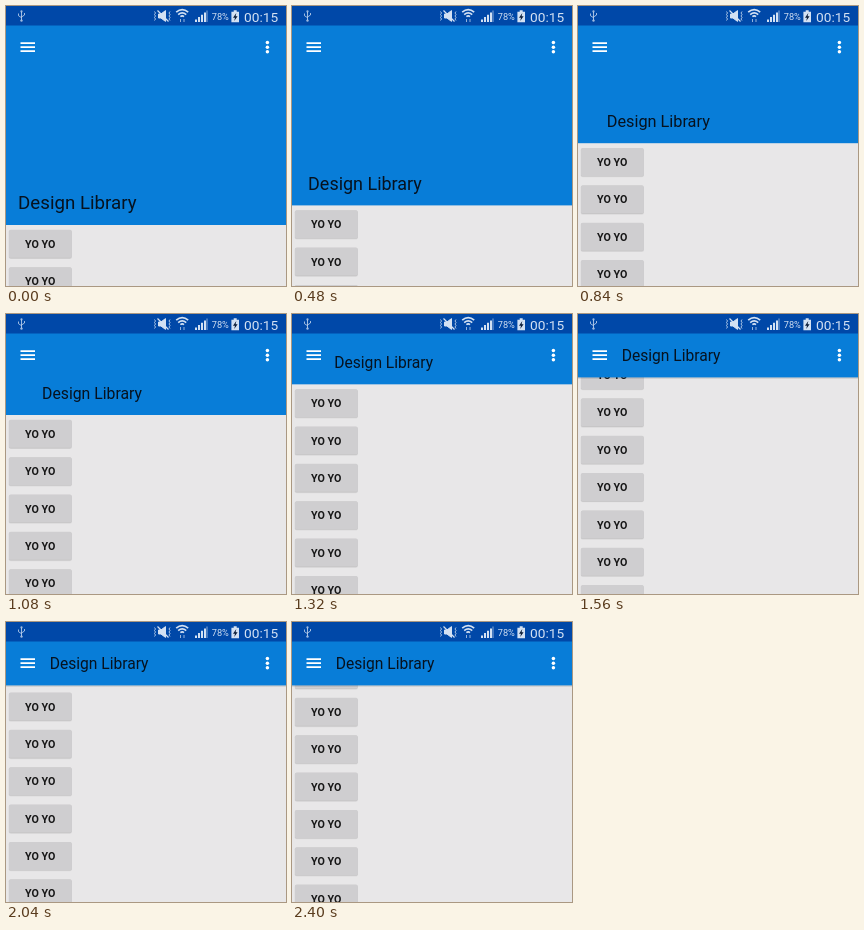
An HTML page that plays this animation: 280x280 px, repeating every 2520 ms.

```html
<!DOCTYPE html>
<html lang="en">
<head>
<meta charset="utf-8">
<title>Collapsing toolbar</title>
<style>
  html, body { margin: 0; width: 100%; height: 100%; overflow: hidden; background: #e8e7e8; }
  svg { display: block; width: 100vw; height: 100vh; font-family: Roboto, "Noto Sans", sans-serif; }
</style>
</head>
<body>
<svg viewBox="0 0 280 280">
  <defs>
    <linearGradient id="shade" x1="0" y1="0" x2="0" y2="1">
      <stop offset="0" stop-color="#000" stop-opacity=".2"/>
      <stop offset="1" stop-color="#000" stop-opacity="0"/>
    </linearGradient>
    <g id="button">
      <rect x="2.6" y="-13.7" width="63.4" height="29" rx="2" fill="#000" opacity=".06"/>
      <rect x="3" y="-13.6" width="62.6" height="28.2" rx="1.6" fill="#000" opacity=".1"/>
      <rect x="3" y="-14" width="62.6" height="28" rx="1.5" fill="#cfced0"/>
      <text x="34.2" y="4.1" font-size="10.7" font-weight="700" text-anchor="middle" fill="#161616">YO YO</text>
    </g>
  </defs>

  <rect width="280" height="280" fill="#e8e7e8"/>
  <g id="list"></g>
  <rect id="shadow" width="280" height="2" fill="url(#shade)"/>
  <rect id="header" y="19" width="280" fill="#087dd8"/>
  <text id="title" fill="#06121f">Design Library</text>

  <!-- toolbar icons -->
  <path d="M14.5 37.1h14.5M14.5 41.1h14.5M14.5 45.1h14.5" stroke="#fff" stroke-width="1.7"/>
  <g fill="#fff">
    <circle cx="261.4" cy="36.6" r="1.75"/>
    <circle cx="261.4" cy="41.2" r="1.75"/>
    <circle cx="261.4" cy="45.8" r="1.75"/>
  </g>

  <!-- status bar -->
  <rect width="280" height="19.5" fill="#0048a8"/>
  <g fill="none" stroke="#d3e1f3" stroke-width="1">
    <path d="M15.5 6v8M12.5 7.5v2.2l3 2M18.5 7v2l-3 2" opacity=".75"/>
    <path d="M148.5 5.5l1 1.5-1 1.5 1 1.5-1 1.5 1 1.5-1 1.5M164 5.5l-1 1.5 1 1.5-1 1.5 1 1.5-1 1.5 1 1.5" opacity=".8"/>
    <path d="M152.5 8h2.4l4.6-3.4v10.8l-4.6-3.4h-2.4z" fill="#d3e1f3"/>
    <path d="M151.5 4.5l11 11" stroke-width="1.3"/>
    <path d="M170.2 6.2q6-5.2 12 0M172.2 8.6q4-3.4 8 0" stroke-width="1.7"/>
    <path d="M174.4 10.7q1.8-1.5 3.6 0" stroke-width="1.6"/>
    <path d="M174.5 13v3M178 13v3" opacity=".7"/>
    <path d="M190 16v-2.6M193 16v-5M196 16v-7.2M199 16v-9.4" stroke-width="2"/>
    <path d="M201 16V4.5" opacity=".65"/>
  </g>
  <g fill="#d3e1f3">
    <circle cx="15.5" cy="5.4" r="1.1" opacity=".75"/>
    <circle cx="15.5" cy="14.6" r="1.2" opacity=".75"/>
    <path d="M227.7 4.3h3v1.4h2.3v10.6h-7.6V5.7h2.3z"/>
    <text x="205.8" y="14.3" font-size="9.2">78%</text>
    <text x="238.1" y="16" font-size="13.7">00:15</text>
  </g>
  <path d="M230.3 6.9l-3.3 4.8h2l-.8 3.4 3.4-4.8h-2z" fill="#0a1c38"/>
</svg>

<script>
const LOOP = 2520, STEP = 120;
const EXPANDED = 219, COLLAPSED = 63.4, RANGE = EXPANDED - COLLAPSED;
const BUTTON_GAP = 37.35, BUTTON_COUNT = 15;

// [time in ms, scroll distance]
const drag = [[0, 0], [480, 19.6], [840, 81.8], [1080, 118], [1560, 176.8], [2040, 228], [2400, 260]];

const $ = id => document.getElementById(id);
const mix = (a, b, k) => a + (b - a) * k;
const set = (el, attrs) => {
  for (const name in attrs) el.setAttribute(name, attrs[name]);
};

for (let i = 0; i < BUTTON_COUNT; i++) {
  const button = document.createElementNS("http://www.w3.org/2000/svg", "use");
  set(button, { href: "#button", y: i * BUTTON_GAP });
  $("list").append(button);
}

const slope = i => (drag[i + 1][1] - drag[i][1]) / (drag[i + 1][0] - drag[i][0]);

// Harmonic mean of neighbouring slopes keeps the curve monotone.
function tangent(i) {
  if (i === 0) return 0;
  if (i === drag.length - 1) return slope(i - 1);
  const a = slope(i - 1), b = slope(i);
  return 2 * a * b / (a + b);
}

function scrollAt(time) {
  let i = 0;
  while (i < drag.length - 2 && time >= drag[i + 1][0]) i++;
  const [t0, y0] = drag[i], [t1, y1] = drag[i + 1];
  const span = t1 - t0, k = (time - t0) / span, r = 1 - k;
  return y0 * r * r * (1 + 2 * k) + y1 * k * k * (3 - 2 * k)
    + span * k * r * (tangent(i) * r - tangent(i + 1) * k);
}

function render(time) {
  const scroll = scrollAt(time);
  const fold = Math.min(1, scroll / RANGE);
  const bottom = mix(EXPANDED, COLLAPSED, fold);
  const shrink = 1 - (1 - fold) ** 2;

  set($("list"), { transform: `translate(0 ${237.8 - scroll})` });
  set($("header"), { height: bottom - 19 });
  set($("shadow"), { y: bottom, opacity: fold === 1 ? 1 : 0 });
  set($("title"), {
    x: mix(12.1, 43.7, fold),
    y: mix(203.4, 47.1, fold),
    "font-size": mix(18.7, 15.6, shrink)
  });
}

const start = performance.now();
function tick() {
  const time = (performance.now() - start) % LOOP;
  render(Math.floor(time / STEP) * STEP);
  requestAnimationFrame(tick);
}
tick();
</script>
</body>
</html>
```
